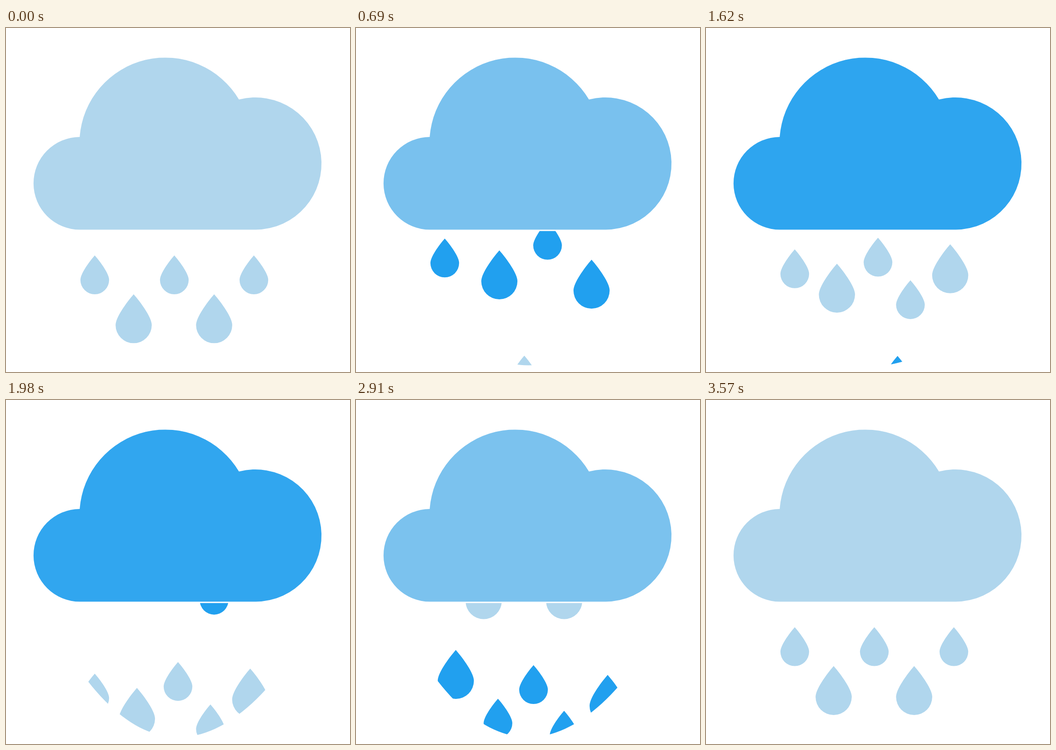
Animation, 748 px wide and 748 px high, one loop 3.6 s. Source, as an HTML page with a canvas:

```html
<!DOCTYPE html>
<html lang="en">
<head>
<meta charset="utf-8">
<title>Rain cloud</title>
<style>
  html, body { margin: 0; width: 100%; height: 100%; overflow: hidden; background: #fff; }
  canvas { display: block; }
</style>
</head>
<body>
<canvas id="stage" width="748" height="748"></canvas>
<script>
const ctx = document.getElementById('stage').getContext('2d');
const LOOP = 3600;      // ms
const CYCLE = 3571.5;   // motion ends here and rests until the loop restarts
const SPEED = 0.3158;   // px per ms
const PALE = [176, 214, 237];
const BLUE = [33, 160, 239];
const BIG = 1.26;

const cloud = new Path2D('M161 438.5A100.75 100.75 0 0 1 160.2 237A186.6 186.6 0 0 1 506.6 155.5A143.75 143.75 0 1 1 543.3 438.5Z');
const drop = new Path2D('M0 0C13 15 31.2 40 31.2 53.3A31.2 31.2 0 0 1 -31.2 53.3C-31.2 40 -13 15 0 0Z');
const rainArea = new Path2D('M74.5 441.5H694.5C587.8 634.5 481.2 733.5 374.5 733.5C274.5 733.5 174.5 643.5 74.5 441.5Z');

// Each drop: x, y of its tip at the shower's time, scale
const paleShower = [[193, 494.2, 1], [366, 494.2, 1], [539, 494.2, 1], [277.6, 578.6, BIG], [452.6, 578.6, BIG]];
const showers = [
  { time: 0, color: PALE, drops: paleShower },
  { time: 690, color: BLUE, drops: [[193, 457.5, 1], [311.7, 483.2, BIG], [416.5, 419, 1], [512.2, 503.4, BIG]] },
  { time: 1980, color: PALE, drops: [[193, 594.7, 1], [284.7, 625.8, BIG], [374, 569.4, 1], [444.5, 661.8, 1], [531, 583.6, BIG]] },
  { time: 2580, color: BLUE, drops: [[217, 439, BIG], [308.7, 545, 1], [386, 472, 1], [452.5, 571.3, 1], [547.2, 493.2, BIG]] },
  { time: CYCLE, color: PALE, drops: paleShower },
];

const rgb = c => `rgb(${c.map(Math.round)})`;
const mix = (a, b, k) => a.map((v, i) => v + (b[i] - v) * k);

function draw(t) {
  ctx.fillStyle = '#fff';
  ctx.fillRect(0, 0, 748, 748);

  ctx.fillStyle = rgb(mix(PALE, BLUE, 1 - Math.abs(1 - 2 * t / CYCLE)));
  ctx.fill(cloud);

  ctx.save();
  ctx.clip(rainArea);
  for (const { time, color, drops } of showers) {
    ctx.fillStyle = rgb(color);
    for (const [x, y, scale] of drops) {
      ctx.save();
      ctx.translate(x, y + (t - time) * SPEED);
      ctx.scale(scale, scale);
      ctx.fill(drop);
      ctx.restore();
    }
  }
  ctx.restore();
}

function tick() {
  draw(Math.min(performance.now() % LOOP, CYCLE));
  requestAnimationFrame(tick);
}
tick();
</script>
</body>
</html>
```
